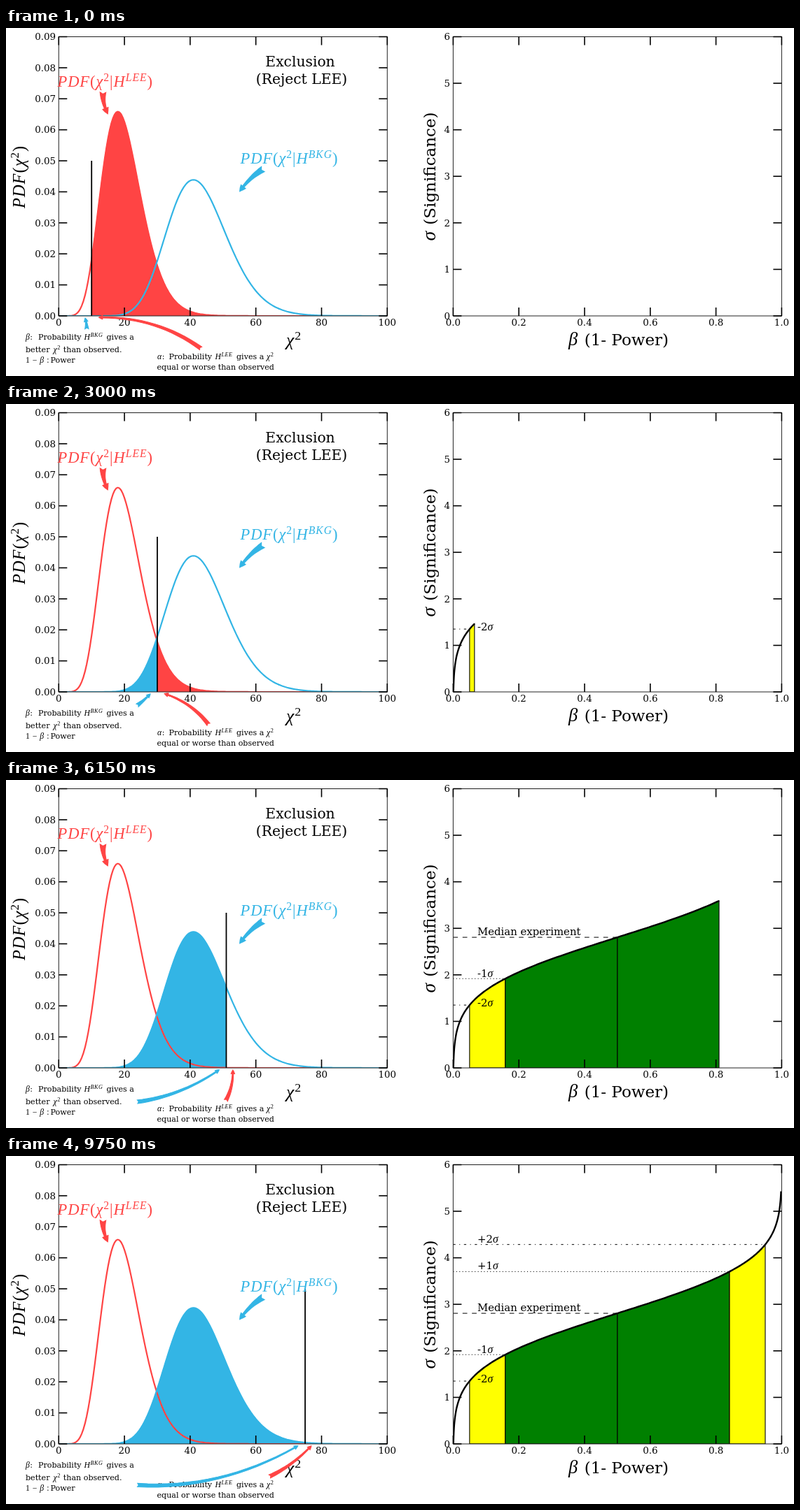
Animation, 1125 px wide and 498 px high, one loop 9.9 s. Source, as an HTML page with a canvas:

```html
<!DOCTYPE html>
<html lang="en">
<head>
<meta charset="utf-8">
<title>Exclusion test</title>
<style>
  html, body { margin: 0; width: 100%; height: 100%; overflow: hidden; background: #fff; }
  canvas { display: block; width: 100%; height: 100%; }
</style>
</head>
<body>
<canvas id="stage" width="1125" height="498"></canvas>
<script>
const ctx = document.getElementById('stage').getContext('2d');
const SERIF = '"DejaVu Serif", serif';
const ROMAN = '"Liberation Serif", serif';
const RED = '#ff4444', BLUE = '#33b5e5';
const STEP_MS = 150, STEPS = 66, FIRST_X = 10;
const LEE = 20, BKG = 43; // degrees of freedom
const GRID = 0.1;         // integration step; areas stop one step before the cut

// ---------- statistics ----------
function gamma(a) {
  let g = a % 1 ? Math.sqrt(Math.PI) : 1;
  for (let b = a % 1 || 1; b < a; b++) g *= b;
  return g;
}
const pdf = (x, k) => x <= 0 ? 0 :
  Math.exp((k / 2 - 1) * Math.log(x) - x / 2 - k / 2 * Math.LN2) / gamma(k / 2);

function cdf(x, k) {
  let term = 2 * x * pdf(x, k) / k, sum = 0;
  for (let n = 1; term > 1e-14; n++) {
    sum += term;
    term *= x / (k + 2 * n);
  }
  return sum;
}
function solve(f, lo, hi) { // root of a rising function
  for (let i = 0; i < 40; i++) {
    const mid = (lo + hi) / 2;
    if (f(mid) < 0) lo = mid; else hi = mid;
  }
  return lo;
}
function significance(x) {
  const alpha = 1 - cdf(x, LEE);
  return solve(z => alpha - (1 - cdf(z * z, 1)) / 2, 0, 7);
}
const START_X = solve(x => cdf(x, LEE) - 0.5, 10, 30);
const quantile = p => solve(x => cdf(x, BKG) - p, 10, 90);

// ---------- axes ----------
const axes = (left, xMax, yMax) => ({
  left, xMax, yMax, top: 12.5, width: 469, height: 399.5,
  x: v => left + v / xMax * 469,
  y: v => 412 - v / yMax * 399.5
});
const dist = axes(75.3, 100, 0.09), power = axes(638.4, 1, 6);

function line(points, color, width, dash = []) {
  ctx.beginPath();
  points.forEach(p => ctx.lineTo(...p));
  ctx.strokeStyle = color;
  ctx.lineWidth = width;
  ctx.setLineDash(dash);
  ctx.stroke();
  ctx.setLineDash([]);
}
function polygon(points, fill, edge, width) {
  ctx.beginPath();
  points.forEach(p => ctx.lineTo(...p));
  ctx.closePath();
  ctx.fillStyle = fill;
  ctx.fill();
  ctx.strokeStyle = edge;
  ctx.lineWidth = width;
  ctx.stroke();
}
function sample(f, x0, x1, step) {
  const points = [];
  for (let x = x0; x < x1; x += step) points.push(f(x));
  points.push(f(x1));
  return points;
}
function clipped(a, draw) {
  ctx.save();
  ctx.beginPath();
  ctx.rect(a.left, a.top, a.width, a.height);
  ctx.clip();
  draw();
  ctx.restore();
}
function frame(a, xStep, xDigits, yStep, yDigits) {
  const right = a.left + a.width, bottom = a.top + a.height;
  ctx.strokeStyle = '#222';
  ctx.lineWidth = 1;
  ctx.strokeRect(a.left, a.top, a.width, a.height);
  for (let i = 0; i * xStep <= a.xMax + 1e-9; i++) {
    const x = a.x(i * xStep);
    line([[x, bottom], [x, bottom - 12]], '#000', 1.6);
    line([[x, a.top], [x, a.top + 12]], '#000', 1.6);
    rich((i * xStep).toFixed(xDigits), x, 426.3, 13.4, { align: 0.5 });
  }
  for (let i = 0; i * yStep <= a.yMax + 1e-9; i++) {
    const y = a.y(i * yStep);
    line([[a.left, y], [a.left + 12, y]], '#000', 1.6);
    line([[right, y], [right - 12, y]], '#000', 1.6);
    rich((i * yStep).toFixed(yDigits), a.left - 4.3, y + 4.7, 13.4, { align: 1 });
  }
}

// ---------- text: *math italic*, ^superscript^ ----------
function rich(str, x, y, size, { color = '#000', base = SERIF, align = 0, angle = 0 } = {}) {
  const runs = str.match(/\*[^*]+\*|\^[^^]+\^|[^*^]+/g).map(run => {
    const sup = run[0] === '^', math = sup || run[0] === '*';
    const s = math ? run.slice(1, -1) : run;
    const px = size * (sup ? 0.74 : math || base === ROMAN ? 1.06 : 1);
    const style = math && !/^\d/.test(s) ? 'italic ' : '';
    return { s, sup, font: `${style}${px}px ${math ? ROMAN : base}`,
      spacing: math || base === ROMAN ? size * 0.045 + 'px' : '0px' };
  });
  const use = run => { ctx.font = run.font; ctx.letterSpacing = run.spacing; };
  let total = 0;
  for (const run of runs) {
    use(run);
    run.width = ctx.measureText(run.s).width;
    total += run.width;
  }
  ctx.save();
  ctx.translate(x, y);
  ctx.rotate(angle);
  ctx.fillStyle = color;
  let at = -total * align;
  for (const run of runs) {
    use(run);
    ctx.fillText(run.s, at, run.sup ? -size * 0.37 : 0);
    at += run.width;
  }
  ctx.restore();
}

// ---------- curved, tapering arrow leaving a text box ----------
function arrow(box, [tx, ty], size, color) {
  const [l, t, r, b] = box, rad = 0.2;
  const sx = (l + r) / 2, sy = (t + b) / 2;
  const cx = (sx + tx) / 2 - rad * (ty - sy), cy = (sy + ty) / 2 + rad * (tx - sx);
  const at = u => {
    const v = 1 - u;
    return [v * v * sx + 2 * u * v * cx + u * u * tx, v * v * sy + 2 * u * v * cy + u * u * ty];
  };
  const normal = u => {
    const dx = (1 - u) * (cx - sx) + u * (tx - cx), dy = (1 - u) * (cy - sy) + u * (ty - cy);
    const n = Math.hypot(dx, dy);
    return [-dy / n, dx / n];
  };
  const back = (from, length) => { // curve parameter a given distance before a point
    const [px, py] = at(from);
    let u = from;
    while (u > 0 && Math.hypot(at(u)[0] - px, at(u)[1] - py) < length) u -= 0.001;
    return u;
  };
  let start = 0;
  for (let p = at(0); p[0] > l && p[0] < r && p[1] > t && p[1] < b; p = at(start)) start += 0.001;
  const tip = back(1, 0.8), head = 0.4 * size, half = 0.2 * size;
  const ribbon = (u0, u1, mid, end, notch) => {
    const left = [], right = [];
    for (let i = 0; i <= 16; i++) {
      const s = i / 16, u = u0 + (u1 - u0) * s, [x, y] = at(u), [nx, ny] = normal(u);
      const w = half * (s < 0.5 ? 1 + (mid - 1) * 2 * s : mid + (end - mid) * (2 * s - 1));
      left.push([x + nx * w, y + ny * w]);
      right.unshift([x - nx * w, y - ny * w]);
    }
    const outline = [...left, ...right];
    if (notch) {
      const [x, y] = at(u0), [nx, ny] = normal(u0);
      outline.push([x + ny * notch, y - nx * notch]);
    }
    polygon(outline, color, color, 1.1);
  };
  ribbon(start, Math.max(start, back(tip, head * 0.8)), 0.6, 0.3, 0.12 * size);
  ribbon(Math.max(start, back(tip, head)), tip, 0.6, 0);
}

// ---------- left panel ----------
function drawDistributions(cut) {
  const curve = k => x => [dist.x(x), dist.y(pdf(x, k))];
  const area = (k, x0, x1, color) => polygon(
    [[dist.x(x0), dist.y(0)], ...sample(curve(k), x0, x1, 0.5), [dist.x(x1), dist.y(0)]], color, color, 1);
  clipped(dist, () => {
    area(LEE, cut, 100, RED);
    area(BKG, 0, cut - GRID, BLUE);
    line(sample(curve(LEE), 0, 100, 0.5), RED, 2.2);
    line(sample(curve(BKG), 0, 100, 0.5), BLUE, 2.2);
    line([[dist.x(cut), dist.y(0)], [dist.x(cut), dist.y(0.05)]], '#000', 1.8);
  });
  frame(dist, 20, 0, 0.01, 2);
  rich('*χ*^2^', 400, 455, 24);
  rich('*PDF*(*χ*^2^)', 27, 258, 23, { base: ROMAN, angle: -Math.PI / 2 });
  rich('Exclusion', 420, 55, 20.3, { align: 0.5 });
  rich('(Reject LEE)', 422, 80, 20.3, { align: 0.5 });

  arrow([68, 62, 214, 92], [dist.x(15), dist.y(0.065)], 21, RED);
  rich('*PDF*(*χ*^2^|*H*^LEE^)', 73.5, 83.5, 21.2, { base: ROMAN, color: RED });
  arrow([329, 173, 479, 202], [dist.x(55), dist.y(0.04)], 21, BLUE);
  rich('*PDF*(*χ*^2^|*H*^BKG^)', 334.5, 194, 21.2, { base: ROMAN, color: BLUE });

  const targetY = dist.y(-0.0005);
  arrow([212, 458.5, 390, 495.5], [dist.x(cut + 2), targetY], 13, RED);
  rich('*α*:', 216, 474, 11.1);
  rich('Probability', 232.5, 474, 11.1);
  rich('*H*^LEE^', 298.5, 474, 11.1);
  rich('gives a', 329, 474, 11.1);
  rich('*χ*^2^', 372, 474, 11.1);
  rich('equal or worse than observed', 215.5, 489, 11.1);

  arrow([29, 430.5, 187.5, 487.5], [dist.x(cut - 2), targetY], 13, BLUE);
  rich('*β*:', 28, 446, 11.1);
  rich('Probability', 46, 446, 11.1);
  rich('*H*^BKG^', 111.5, 446, 11.1);
  rich('gives a', 143.5, 446, 11.1);
  rich('better', 28, 464, 11.1);
  rich('*χ*^2^', 67.5, 464, 11.1);
  rich('than observed.', 165.5, 464, 11.1, { align: 1 });
  rich('1 − *β* :', 28, 479, 11.1, { base: ROMAN });
  rich('Power', 98.5, 479, 11.1, { align: 1 });
}

// ---------- right panel ----------
const DOTTED = [1.1, 3.3], DASH_DOT = [3.3, 5.5, 1.1, 5.5];
const levels = [
  { p: 0.05, label: '-2*σ*', labelY: 324, dash: DASH_DOT, fill: '#ff0' },
  { p: 0.1587, label: '-1*σ*', labelY: 282, dash: DOTTED, fill: '#008000' },
  { p: 0.5, label: 'Median experiment', labelY: 221.5, dash: [6.7, 6.7], fill: '#008000' },
  { p: 0.8413, label: '+1*σ*', labelY: 162, dash: DOTTED, fill: '#ff0' },
  { p: 0.95, label: '+2*σ*', labelY: 123.5, dash: DASH_DOT }
].map(level => ({ ...level, x: quantile(level.p) }));

const powerPoint = x => [power.x(cdf(x, BKG)), power.y(significance(x))];

function drawPower(end) {
  const reached = levels.filter(level => level.x < end);
  clipped(power, () => {
    reached.forEach(({ x, fill }, i) => {
      if (!fill) return;
      const top = sample(powerPoint, x, Math.min(end, levels[i + 1].x), 0.25);
      polygon([[top[0][0], power.y(0)], ...top, [top.at(-1)[0], power.y(0)]], fill, '#000', 1.1);
    });
    if (end > START_X) line(sample(powerPoint, START_X, end, 0.25), '#000', 2.4);
    for (const { x, dash } of reached) {
      const [px, py] = powerPoint(x);
      line([[power.left, py], [px, py]], '#000', 1, dash);
    }
  });
  frame(power, 0.2, 1, 1, 0);
  for (const { label, labelY } of reached) rich(label, 673, labelY, 14.9);
  rich('*β*', 803, 454, 25);
  rich('(1- Power)', 946, 454, 23, { align: 1 });
  rich('*σ*', 613, 304.5, 26, { angle: -Math.PI / 2 });
  rich('(Significance)', 613, 120.5, 23, { align: 1, angle: -Math.PI / 2 });
}

// ---------- playback ----------
let shown = -1;
function tick() {
  const step = Math.floor(performance.now() / STEP_MS) % STEPS;
  if (step !== shown) {
    shown = step;
    ctx.fillStyle = '#fff';
    ctx.fillRect(0, 0, 1125, 498);
    drawDistributions(FIRST_X + step);
    drawPower(FIRST_X + step - GRID);
  }
  requestAnimationFrame(tick);
}
tick();
</script>
</body>
</html>
```
